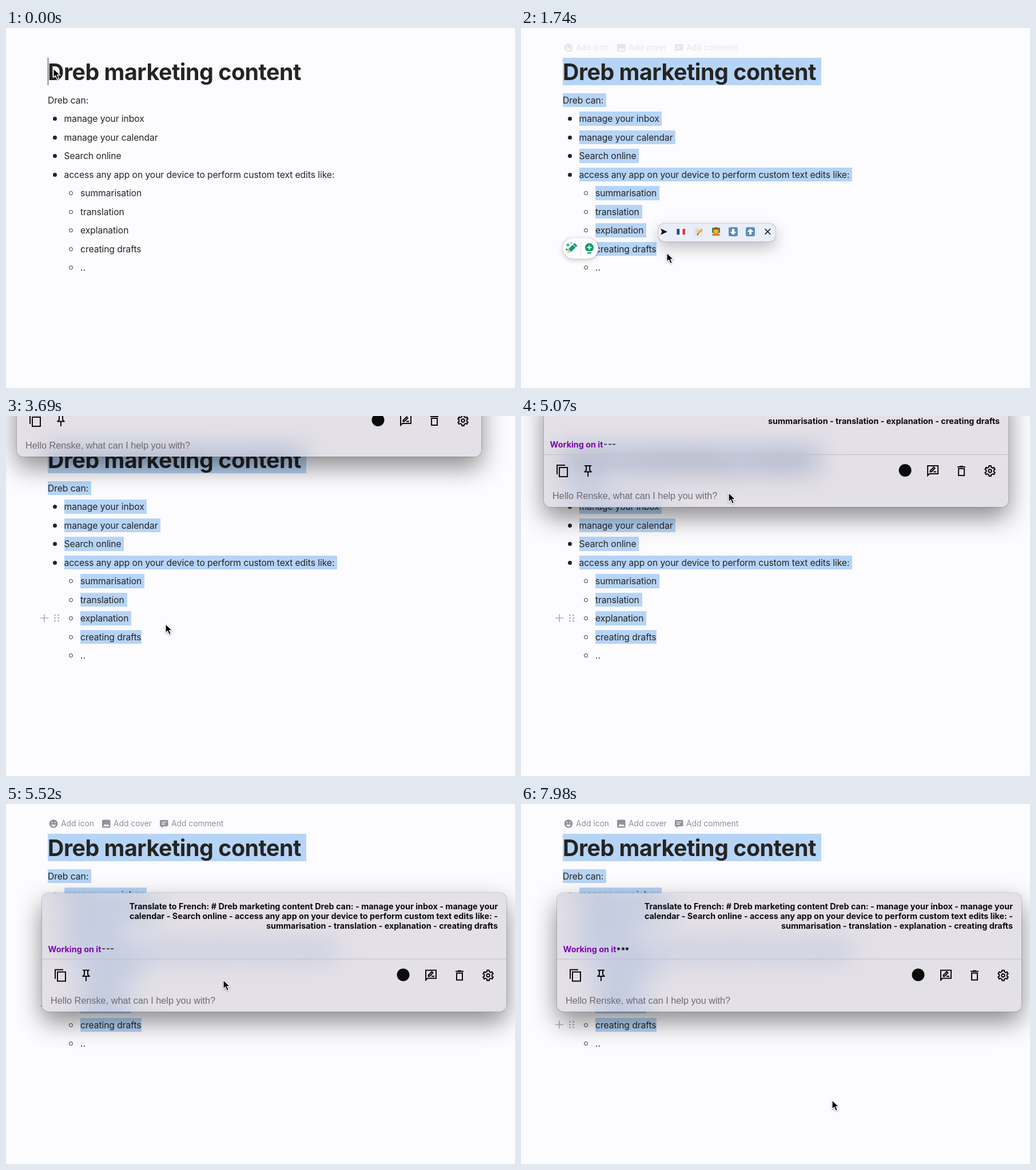
Animation, 890 px wide and 629 px high, one loop 8000 ms. Source, as an HTML page:

```html
<!DOCTYPE html>
<html lang="en">
<head>
<meta charset="utf-8">
<title>Assistant demo</title>
<style>
  html, body { margin: 0; width: 100%; height: 100%; overflow: hidden; background: #fcfbfe; }
  #stage { position: relative; width: 890px; height: 629px; overflow: hidden; background: #fcfbfe;
    font: 15.7px/24.5px Inter, sans-serif; letter-spacing: -.085px; color: #252423; }
  #stage div, #stage svg, #stage i { position: absolute; white-space: nowrap; }
  svg { overflow: visible; }
  .row span { position: relative; top: .75px; display: inline-block; }
  .row .mark { left: 0; top: 0; height: 100%; width: 0; background: #b6d4f6; }
  .title { font: bold 39.3px/48px Inter, sans-serif; letter-spacing: -.46px; }
  .disc, .ring { box-sizing: border-box; width: 7px; height: 7px; border-radius: 50%; background: #252423; }
  .ring { background: none; border: 1.4px solid #252423; }
  #caret { left: 73px; top: 52px; width: 1px; height: 48px; background: #333; }
  #tools { left: 0; top: 0; font-size: 13.8px; letter-spacing: 0; color: #929194; }
  #tools div { top: 22px; }
  #pill { left: 73px; top: 367px; width: 62px; height: 36px; border-radius: 18px; background: #fff;
    box-shadow: 0 2px 9px rgba(0,0,0,.22), 0 0 1px rgba(0,0,0,.4); }
  #popup { left: 240px; top: 342px; width: 205px; height: 31px; border-radius: 10px; background: #e9eef9;
    box-shadow: 0 10px 26px rgba(0,0,0,.25), 0 0 1.5px rgba(0,0,0,.6); }
  #panel { left: 0; top: 0; width: 812px; height: 207px; border-radius: 12px; color: #0b0b0c;
    font: bold 14.35px/17px Inter, sans-serif; letter-spacing: 0;
    box-shadow: 0 18px 44px rgba(0,0,0,.46), 0 0 1.5px rgba(0,0,0,.75); }
  #glass, #tint { left: 0; top: 0; width: 100%; height: 100%; }
  #glass { overflow: hidden; border-radius: 12px; background: #fcfbfe;
    font: 15.7px/24.5px Inter, sans-serif; letter-spacing: -.085px; }
  #tint { background: rgba(213,207,217,.62); }
  .blurred { left: 0; top: 0; filter: blur(22px) saturate(1.5); }
  #message { right: 15px; top: 13.5px; text-align: right; }
  #working { left: 10.5px; top: 88.5px; color: #7b04b1; }
  #rule { left: 0; top: 115px; width: 100%; height: 1px; background: #c0bbc3; }
  #prompt { left: 15px; top: 177px; font: 16.25px/20px "Liberation Sans", Arial, sans-serif; color: #6c6a70; }
  #panel i { top: 95px; width: 5px; height: 5px; border-radius: 50%; background: #222; }
</style>
</head>
<body>
<div id="stage">
  <div id="page"></div>
  <div id="caret"></div>
  <div id="tools">
    <svg width="1" height="1" fill="#929194">
      <circle cx="83" cy="34.5" r="7.3"/>
      <g fill="#fcfbfe"><circle cx="80.4" cy="32.6" r="1.1"/><circle cx="85.6" cy="32.6" r="1.1"/><path d="M79 36h8q-1 3.6-4 3.6t-4-3.6z"/></g>
      <rect x="168" y="27.5" width="14.5" height="14" rx="2"/>
      <path d="M170 39l3.5-4.5 2.4 2.8 2-2.4 3.2 4.1z" fill="#fcfbfe"/>
      <path d="M270.5 28h11.5q1.5 0 1.5 1.5v8q0 1.5-1.5 1.5h-7l-3.5 3v-3h-1q-1.5 0-1.5-1.5v-8q0-1.5 1.5-1.5z"/>
      <path d="M272 31.7h8.500M272 35h6" stroke="#fcfbfe" stroke-width="1.3"/>
    </svg>
    <div style="left:96px">Add icon</div>
    <div style="left:188px">Add cover</div>
    <div style="left:289px">Add comment</div>
  </div>
  <svg id="handle" width="1" height="1" fill="#b0afb3"><path d="M-7 0H7M0-7V7" stroke="#b0afb3" stroke-width="1.6"/></svg>
  <div id="pill">
    <svg width="62" height="36">
      <path d="M31 7v22" stroke="#ddd"/>
      <g transform="translate(16 18) rotate(45)">
        <path d="M-3.5-10h7v15l-3.5 6-3.5-6z" fill="#129c72"/>
        <path d="M-3.5 5h7L0 11z" fill="#f0c48c"/><path d="M-3.5-6h7" stroke="#fff"/>
      </g>
      <path d="M9 9v6M6 12h6M7 18v4M5 20h4M15 7v3" stroke="#129c72" stroke-width="1.4"/>
      <path d="M42.5 23q-3.5-2.5-3.5-6.5a7.5 7.5 0 0 1 15 0q0 4-3.5 6.5z" fill="#0b9a70"/>
      <path d="M43 26h7" stroke="#0b9a70" stroke-width="2.5"/>
      <path d="M46.5 12.5v8M42.5 16.5h8" stroke="#fff" stroke-width="1.8"/>
    </svg>
  </div>
  <div id="popup">
    <svg width="205" height="31">
      <path d="M4 8.5L16 14 4 19.5l2.5-5.5z" fill="#111"/>
      <path d="M32.5 9h5v10h-5z" fill="#2b3f9b"/><path d="M37.5 9h5v10h-5z" fill="#fff"/><path d="M42.5 9h4.5v10h-4.5z" fill="#dc3340"/>
      <rect x="64" y="8" width="12" height="13" rx="1" fill="#f6f3e6" stroke="#c9c6b8" stroke-width=".8"/>
      <path d="M66 11h8M66 13.5h8M66 16h5" stroke="#999" stroke-width=".8"/>
      <path d="M69 18l8-8" stroke="#eba02c" stroke-width="3"/><path d="M68 19.5l2-2" stroke="#555" stroke-width="2"/>
      <rect x="94" y="7" width="14" height="9" rx="1" fill="#4b8059"/>
      <path d="M94 21q0-5 7-5t7 5z" fill="#d9822b"/><circle cx="101" cy="12" r="4.5" fill="#f3b62f"/>
      <path d="M96.5 11q0-5 4.5-5t4.5 5q-4-2-9 0z" fill="#a3541f"/>
      <g id="arrows"></g>
      <path d="M186.5 9l9.5 9.5M196 9l-9.5 9.5" stroke="#111" stroke-width="1.7"/>
    </svg>
  </div>
  <div id="panel">
    <div id="glass"></div>
    <div id="message">Translate to French: # Dreb marketing content Dreb can: - manage your inbox - manage your<br>calendar - Search online - access any app on your device to perform custom text edits like: -<br>summarisation - translation - explanation - creating drafts</div>
    <div id="working">Working on it</div>
    <i style="left:104.5px"></i><i style="left:112.5px"></i><i style="left:120px"></i>
    <div id="rule"></div>
    <svg id="icons" width="812" height="207" fill="none" stroke="#0b0b0c" stroke-width="2"></svg>
    <div id="prompt">Hello Renske, what can I help you with?</div>
  </div>
  <svg id="cursor" width="1" height="1">
    <path d="M0 0v15.5l3.6-3.3 2.7 6.3 3-1.3-2.7-6.1h5z" fill="#000" stroke="#fff" stroke-width="1.2" style="filter:drop-shadow(0 1px 1.5px rgba(0,0,0,.35))"/>
  </svg>
</div>
<script>
const $ = id => document.getElementById(id);
const clamp = (v, lo, hi) => Math.min(hi, Math.max(lo, v));
const ramp = (t, start, length) => clamp((t - start) / length, 0, 1);
const LOOP = 8000, PITCH = 32.5;

// Document rows: the title, a paragraph, then bullets of two depths
const bullets = ['manage your inbox', 'manage your calendar', 'Search online',
  'access any app on your device to perform custom text edits like:',
  'summarisation', 'translation', 'explanation', 'creating drafts', '..'];
const rows = [
  { x: 73, y: 76, h: 48, text: 'Dreb marketing content', extra: 9, title: true },
  { x: 73, y: 126, h: 24.5, text: 'Dreb can:', extra: 4.5 },
  ...bullets.map((text, i) => ({
    x: i < 4 ? 101.5 : 130, y: 158.5 + i * PITCH, h: 24.5, text,
    extra: i === 7 ? 0 : 4.5, bullet: i < 4 ? 'disc' : 'ring'
  }))
];

function add(parent, className, x, y) {
  const el = document.createElement('div');
  el.className = className;
  el.style.left = x + 'px';
  el.style.top = y + 'px';
  return parent.appendChild(el);
}

for (const row of rows) {
  const el = add($('page'), row.title ? 'row title' : 'row', row.x, row.y - row.h / 2);
  row.mark = add(el, 'mark', 0, 0);
  row.label = el.appendChild(document.createElement('span'));
  row.label.textContent = row.text;
  if (row.bullet) add($('page'), row.bullet, row.x - 19.6, row.y - 3.5);
}

for (const x of [18.5, 24.5])
  for (const y of [-5, 0, 5])
    $('handle').innerHTML += `<circle cx="${x}" cy="${y}" r="1.5"/>`;

[[131, 1], [161, -1]].forEach(([x, dir]) => {
  $('arrows').innerHTML += `<g transform="translate(${x} 14) scale(1 ${dir})">
    <rect x="-8" y="-8" width="16" height="16" rx="3" fill="#5c8fb5"/>
    <path d="M-2-5h4v5h3.5L0 5.5-5.5 0H-2z" fill="#fff"/></g>`;
});

function gearPath() {
  const points = [];
  for (let i = 0; i < 6; i++)
    for (const [turn, r] of [[-.27, 7], [-.19, 9.2], [.19, 9.2], [.27, 7]]) {
      const a = (i + turn) * Math.PI / 3;
      points.push((12 + r * Math.sin(a)).toFixed(1) + ' ' + (12 + r * Math.cos(a)).toFixed(1));
    }
  return 'M' + points.join('L') + 'ZM9.3 12a2.7 2.7 0 1 0 5.4 0a2.7 2.7 0 1 0-5.4 0';
}

const icon = (x, path) => `<path transform="translate(${x - 12} 132)" d="${path}"/>`;
$('icons').innerHTML =
  icon(32, 'M3 18V2H17M7 6H21V22H7Z') +
  icon(77, 'M6 3H18M9 3V9.5Q9 12.5 5.5 13.5H18.5Q15 12.5 15 9.5V3M12 13.5V22') +
  '<circle cx="631.5" cy="143" r="11" fill="#0b0b0c" stroke="none"/>' +
  icon(680, 'M3 20V3H21V17H6ZM7.5 13.5V11.5L13.5 5.5 15.5 7.5 9.5 13.5ZM13 13.5H18') +
  icon(730, 'M5 5H19M9 4H15M7 8V20H17V8Z') +
  icon(780, gearPath());

// Eased path through [time, x, y] stops
function along(stops, t, ease = u => u * u * (3 - 2 * u)) {
  const next = stops.findIndex(s => s[0] > t);
  if (next === 0) return stops[0].slice(1);
  if (next < 0) return stops[stops.length - 1].slice(1);
  const a = stops[next - 1], b = stops[next];
  const u = ease((t - a[0]) / (b[0] - a[0]));
  return [a[1] + (b[1] - a[1]) * u, a[2] + (b[2] - a[2]) * u];
}
const linear = u => u;
const easeOut = u => 1 - (1 - u) ** 3;

const pointerStops = [
  [0, 83, 71], [90, 83, 71], [780, 262, 400], [1400, 255, 393], [1800, 255, 393],
  [2450, 279, 363.5], [4150, 279, 363.5], [4750, 345, 48], [4900, 345, 48]
];
const dragPointer = [[4900, 345, 48], [5070, 363, 133.5], [5220, 376, 272.5], [5520, 380, 307.5]];
const exitPointer = [[5520, 380, 307.5], [5800, 380, 307.5], [6460, 544, 517.5]];
const dragPanel = [[4900, 19, -136], [5070, 40, -49], [5220, 57, 103], [5520, 63, 155.5]];

const dragged = (stops, t) => along(stops, t, t < 5220 ? linear : easeOut);
function pointerAt(t) {
  if (t < 4900) return along(pointerStops, t);
  return t < 5520 ? dragged(dragPointer, t) : along(exitPointer, t);
}

const place = (el, [x, y]) => { el.style.transform = `translate(${x}px, ${y}px)`; };
const show = (el, on) => { el.style.visibility = on ? 'visible' : 'hidden'; };

function rowAt(y) {
  let index = 0;
  rows.forEach((row, i) => { if (y > row.y - (i === 1 ? 13 : PITCH / 2)) index = i; });
  return index;
}

function drawSelection(t) {
  const [x, y] = pointerAt(Math.min(t, 1500));
  const last = t > 90 ? rowAt(y) : -1;
  rows.forEach((row, i) => {
    const full = row.label.offsetWidth;
    const width = i < last ? full + row.extra : i === last ? clamp(x - row.x, 0, full) : 0;
    row.mark.style.width = width + 'px';
  });
  return last;
}

// The panel shows a blurred copy of the fully selected page through its glass
drawSelection(1500);
const blurred = $('page').cloneNode(true);
blurred.removeAttribute('id');
blurred.className = 'blurred';
$('glass').appendChild(blurred);
add($('glass'), '', 0, 0).id = 'tint';

function drawHandle(t, selected) {
  const early = t > 200 && t < 900 && selected > 0;
  show($('handle'), early || t > 2850);
  if (early) place($('handle'), [38, rows[Math.min(selected, 5)].y]);
  else place($('handle'), [67, rows[t < 6050 ? 8 : 9].y - .5]);
}

function drawPanel(t) {
  const [x, y] = dragged(dragPanel, t);
  show($('panel'), t >= 3000);
  $('panel').style.opacity = ramp(t, 2980, 150);
  place($('panel'), [x, y]);
  place(blurred, [-x, -y]);
  const pulse = t < 5700 ? 0 : Math.sin(Math.PI * (t - 5700) / 912) ** 2;
  for (const dot of document.querySelectorAll('#panel i')) {
    dot.style.transform = `scaleY(${.3 + .7 * pulse})`;
    dot.style.borderRadius = pulse > .2 ? '50%' : '0';
  }
}

function draw(t) {
  drawHandle(t, drawSelection(t));
  place($('cursor'), pointerAt(t));
  show($('caret'), t <= 120);
  $('tools').style.opacity = ramp(t, 100, 200) - ramp(t, 900, 200) + ramp(t, 1700, 200);
  show($('pill'), t >= 1450 && t < 2850);
  show($('popup'), t >= 1560 && t < 2800);
  drawPanel(t);
}

const start = performance.now();
(function frame() {
  draw((performance.now() - start) % LOOP);
  requestAnimationFrame(frame);
})();
</script>
</body>
</html>
```
